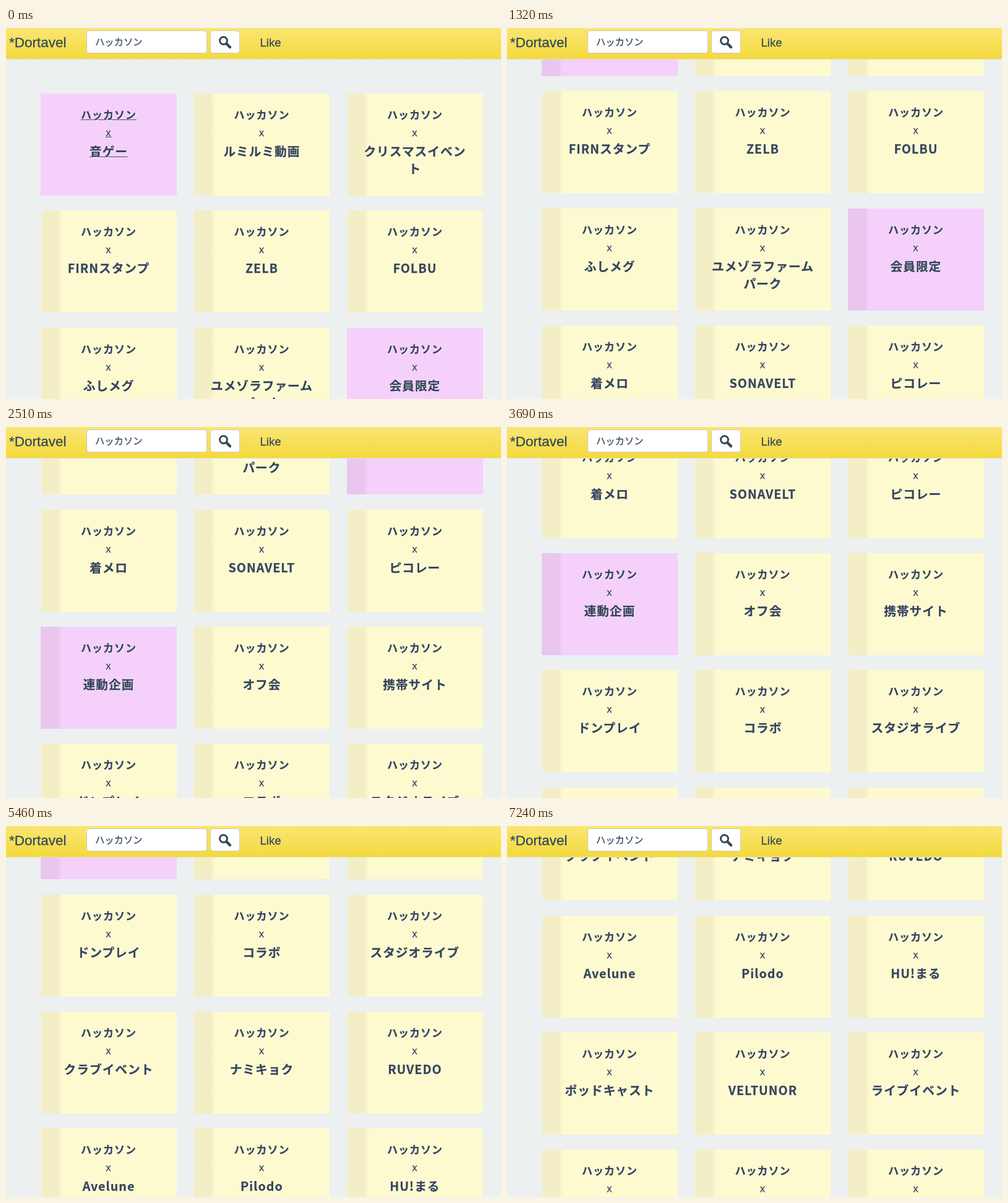
These frames come from a looping animation (800x600 px, 8000 ms). An HTML page:

```html
<!DOCTYPE html>
<html lang="ja">
<head>
<meta charset="utf-8">
<title>Ideas</title>
<style>
  html, body { margin: 0; width: 100%; height: 100%; overflow: hidden; background: #ecf0f1; }
  #stage { position: relative; width: 800px; height: 600px; overflow: hidden; }
  #board { position: absolute; left: 0; top: 0; width: 800px; }
  .card {
    position: absolute; box-sizing: border-box; width: 220px; height: 165px; padding: 20px 22px 0;
    background: #fefad0; box-shadow: inset 1px 0 #f1f2e4;
    color: #35455a; text-align: center; letter-spacing: 1px;
    text-shadow: 1px 1px 1px rgba(255, 255, 255, .7);
    -webkit-text-stroke: .25px #35455a;
  }
  .card.pink { background: #f5d0fb; box-shadow: none; }
  .band {
    position: absolute; left: 1px; top: 0; width: 34px; height: 100%;
    background: linear-gradient(90deg, rgba(60, 40, 30, .06) 28px, rgba(60, 40, 30, .025) 30px 32px, transparent);
  }
  .pink .band { left: 0; }
  .card p { position: relative; margin: 0; text-decoration: inherit; text-decoration-thickness: 1px; }
  .topic, .idea, #bar .query { font-family: "Noto Sans CJK JP", "Noto Sans CJK", sans-serif; }
  .topic { font-weight: 700; font-size: 17px; line-height: 28px; }
  .times { font: 500 16px/31px "Noto Sans", sans-serif; }
  .idea { font-weight: 700; font-size: 19.7px; line-height: 28px; }
  #bar { position: absolute; left: 0; top: 0; }
  #bar text { fill: #34495e; stroke: #34495e; stroke-width: .3px; font-family: "Liberation Sans", Arial, sans-serif; }
  #bar .query { font-size: 15.3px; }
</style>
</head>
<body>
<div id="stage">
  <div id="board"></div>
  <svg id="bar" width="800" height="51">
    <defs>
      <linearGradient id="gold" x2="0" y2="1">
        <stop offset="0" stop-color="#f9e674"/>
        <stop offset="1" stop-color="#f4d93c"/>
      </linearGradient>
    </defs>
    <rect width="800" height="50" fill="url(#gold)"/>
    <rect y="50" width="800" height="1" fill="#e2e2d2"/>
    <text x="5" y="31" font-size="22.5">*Dortavel</text>
    <g fill="#fff" stroke="#cccbc0">
      <rect x="130.5" y="4.5" width="194" height="36" rx="4"/>
      <rect x="330.5" y="4.5" width="47" height="36" rx="4"/>
    </g>
    <text class="query" x="144" y="27.5">ハッカソン</text>
    <g fill="none" stroke="#34495e">
      <circle cx="351.5" cy="20.5" r="6" stroke-width="3"/>
      <path d="M356.5 25.5L362 31" stroke-width="4.5" stroke-linecap="round"/>
    </g>
    <text x="410.5" y="30" font-size="18.5">Like</text>
  </svg>
</div>
<script>
const LOOP = 8000;
const START = 440;
const TICK = 147.9;
const rows = [
  ['音ゲー', 'ルミルミ動画', 'クリスマスイベント'],
  ['FIRNスタンプ', 'ZELB', 'FOLBU'],
  ['ふしメグ', 'ユメゾラファームパーク', '会員限定'],
  ['着メロ', 'SONAVELT', 'ピコレー'],
  ['連動企画', 'オフ会', '携帯サイト'],
  ['ドンプレイ', 'コラボ', 'スタジオライブ'],
  ['クラブイベント', 'ナミキョク', 'RUVEDO'],
  ['Avelune', 'Pilodo', 'HU!まる'],
  ['ポッドキャスト', 'VELTUNOR', 'ライブイベント'],
  ['', '', '']
];
const pinkIdeas = ['音ゲー', '会員限定', '連動企画'];
const columnPitch = 247.45;
const rowPitch = 568 / 3;

const easeIn = u => u ** 1.2;
const easeOut = power => u => 1 - (1 - u) ** power;
const smooth = u => u * u * (3 - 2 * u);

// Each swipe carries the page on to its new scroll offset.
const swipes = [
  { from: 380, to: 1320, y: 193, ease: easeIn },
  { from: 1320, to: 2510, y: 540.5, ease: easeOut(1.3) },
  { from: 2510, to: 3690, y: 659.5, ease: easeOut(1.8) },
  { from: 3690, to: 4280, y: 797, ease: easeOut(5) },
  { from: 4500, to: 4720, y: 803.6, ease: easeIn },
  { from: 4720, to: 6200, y: 997.7, ease: easeOut(1.8) },
  { from: 6550, to: 7240, y: 1286.6, ease: smooth }
];

function scrollAt(time) {
  let y = 0;
  for (const swipe of swipes) {
    if (time <= swipe.from) break;
    const progress = Math.min(1, (time - swipe.from) / (swipe.to - swipe.from));
    y += (swipe.y - y) * swipe.ease(progress);
  }
  return y;
}

function playSteps(element, steps) {
  const frames = steps.map(([time, style]) => ({ ...style, offset: time / LOOP, easing: 'step-end' }));
  frames.push({ ...steps[steps.length - 1][1], offset: 1 });
  element.animate(frames, { duration: LOOP, iterations: Infinity }).startTime = 0;
}

function addPart(parent, tag, className, text = '') {
  const part = document.createElement(tag);
  part.className = className;
  part.textContent = text;
  return parent.appendChild(part);
}

const board = document.getElementById('board');
rows.forEach((ideas, row) => ideas.forEach((idea, column) => {
  const pink = pinkIdeas.includes(idea);
  const card = addPart(board, 'div', pink ? 'card pink' : 'card');
  card.style.left = 56 + column * columnPitch + 'px';
  card.style.top = 106 + row * rowPitch + 'px';
  const band = addPart(card, 'div', 'band');
  if (pink) playSteps(band, [[0, { opacity: 0 }], [START, { opacity: 1 }]]);
  const lines = [
    addPart(card, 'p', 'topic', 'ハッカソン'),
    addPart(card, 'p', 'times', 'x'),
    addPart(card, 'p', 'idea', idea)
  ];
  if (row === 0 && column === 0) {
    lines.forEach(line => playSteps(line, [
      [0, { textDecorationLine: 'underline' }],
      [START, { textDecorationLine: 'none' }]
    ]));
  }
}));

const scrollSteps = [[0, { top: '0px' }]];
for (let tick = START; tick < swipes[swipes.length - 1].to + TICK; tick += TICK) {
  const time = Math.floor(tick / 10) * 10;
  scrollSteps.push([time, { top: -scrollAt(time) + 'px' }]);
}
playSteps(board, scrollSteps);
</script>
</body>
</html>
```
